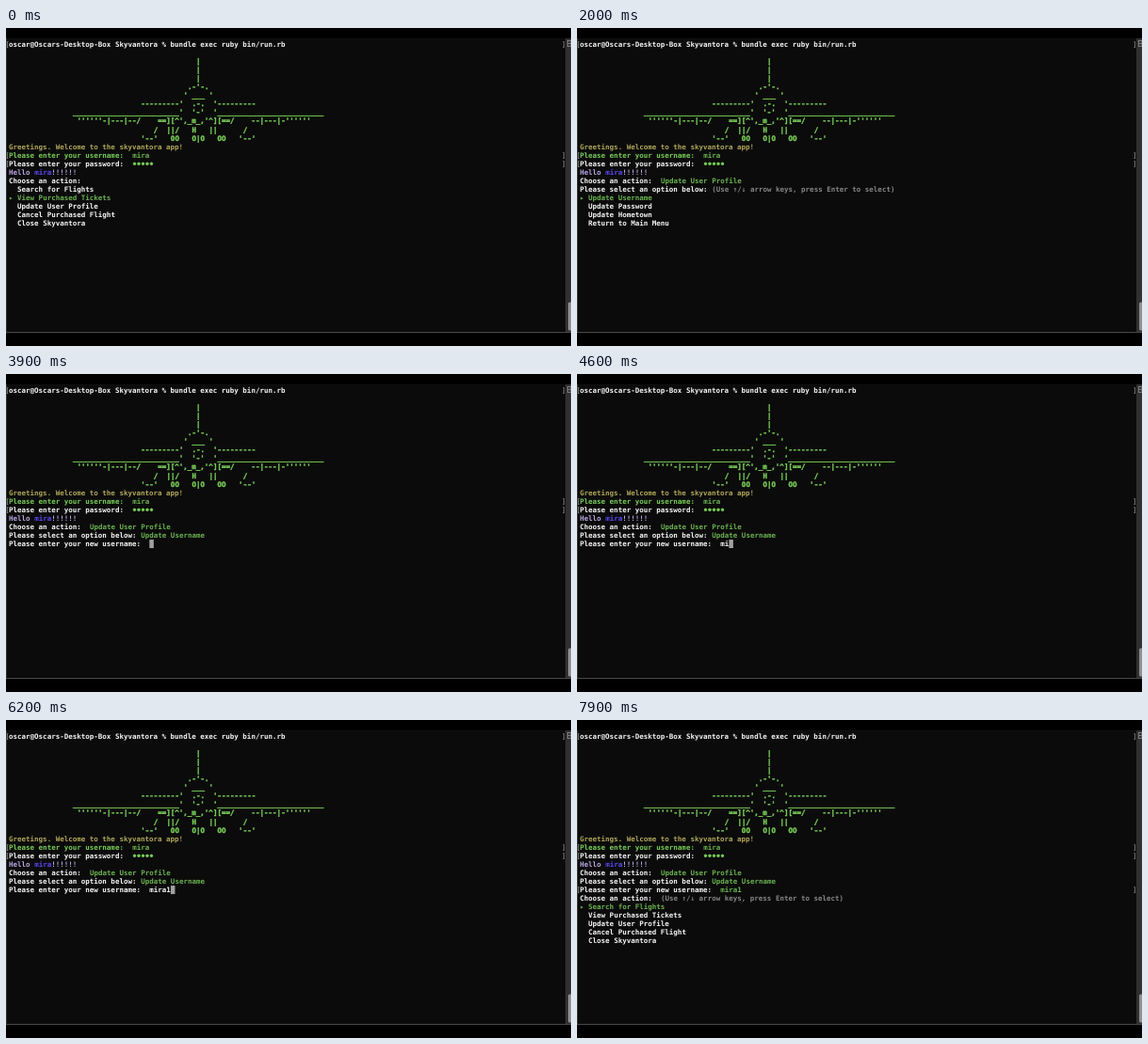
An HTML page that plays this animation: 600x338 px, repeating every 8 s.

```html
<!DOCTYPE html>
<html lang="en">
<head>
<meta charset="utf-8">
<title>Terminal session</title>
<style>
  html, body { margin: 0; width: 100%; height: 100%; overflow: hidden; background: #000; }
  svg { display: block; width: 600px; height: 338px; }
  text {
    font: bold 7.516px "DejaVu Sans Mono", "Noto Sans Mono", monospace;
    white-space: pre;
    text-rendering: geometricPrecision;
  }
  .white { fill: #f4f4f4; }
  .art { fill: #78cc58; stroke: #78cc58; stroke-width: .4px; }
  .ask { fill: #78cc58; }
  .dots { fill: #78cc58; stroke: #78cc58; stroke-width: .8px; }
  .pick { fill: #69b150; }
  .gold { fill: #b0a659; }
  .lilac { fill: #b9a6e2; }
  .blue { fill: #5a48ee; }
  .hint { fill: #858585; }
  .mark { fill: #a0a0a0; font-weight: normal; }
</style>
</head>
<body>
<svg viewBox="0 0 600 338">
  <rect width="600" height="338" fill="#000"/>
  <rect y="11" width="600" height="313" fill="#0b0b0b"/>
  <rect y="11" width="600" height="1" fill="#0f0f0f"/>
  <rect y="11" width="1" height="312" fill="#303030"/>
  <rect y="323" width="600" height="1" fill="#484848"/>
  <rect x="594" y="11" width="6" height="312" fill="#303030"/>
  <rect x="596.5" y="13.5" width="3.5" height="6" fill="none" stroke="#8c8c8c" stroke-width=".8"/>
  <path d="M596.5 16.5h3.5" stroke="#8c8c8c" stroke-width=".8"/>
  <rect x="597" y="291.5" width="5" height="30" rx="1.5" fill="#8e8e8e"/>
  <g id="fixed"></g>
  <g id="live"></g>
</svg>
<script>
const LOOP = 8000;
const LEFT = 3, CELL = 4.525, BASE = 19.8, PITCH = 9.07;
const NS = "http://www.w3.org/2000/svg";
const fixed = document.getElementById("fixed");
const live = document.getElementById("live");

const add = (parent, tag, attrs, content = "") => {
  const el = document.createElementNS(NS, tag);
  for (const key in attrs) el.setAttribute(key, attrs[key]);
  el.textContent = content;
  parent.append(el);
};
const colX = col => LEFT + col * CELL;
const rowY = row => BASE + row * PITCH;

const write = (parent, row, col, style, str) =>
  add(parent, "text", { x: colX(col), y: rowY(row), class: style }, str);

// Small brackets that flag a prompt line at both window edges
const flag = (parent, row) => {
  add(parent, "text", { x: -0.8, y: rowY(row), class: "mark" }, "[");
  add(parent, "text", { x: 590, y: rowY(row), class: "mark" }, "]");
};

const MAIN = ["Search for Flights", "View Purchased Tickets", "Update User Profile",
  "Cancel Purchased Flight", "Close Skyvantora"];
const PROFILE = ["Update Username", "Update Password", "Update Hometown", "Return to Main Menu"];
const HINT = "(Use ↑/↓ arrow keys, press Enter to select)";

function menu(row, items, selected) {
  items.forEach((item, i) => {
    const on = i === selected;
    if (on) write(live, row + i, 0, "pick", "▸");
    write(live, row + i, 2, on ? "pick" : "white", item);
  });
}

// [column, text] for each row of the plane
const PLANE = [
  [44, "|"], [44, "|"], [44, "|"],
  [42, ".-'-."],
  [41, "' ___ '"],
  [31, "---------'  .-.  '---------"],
  [15, "_".repeat(25) + "'  '-'  '" + "_".repeat(25)],
  [16, "''''''-|---|--/    ==][^',_m_,'^][==/    --|---|-''''''"],
  [34, "/  ||/   H   ||      /"],
  [31, "'--'   OO   O|O   OO   '--'"]
];

function drawFixed() {
  write(fixed, 0, 0, "white", "oscar@Oscars-Desktop-Box Skyvantora % bundle exec ruby bin/run.rb");
  PLANE.forEach(([col, str], i) => write(fixed, i + 2, col, "art", str));
  write(fixed, 12, 0, "gold", "Greetings. Welcome to the skyvantora app!");
  write(fixed, 13, 0, "ask", "Please enter your username:");
  write(fixed, 13, 29, "pick", "mira");
  write(fixed, 14, 0, "white", "Please enter your password:");
  write(fixed, 14, 29, "dots", "•••••");
  write(fixed, 15, 0, "lilac", "Hello");
  write(fixed, 15, 6, "blue", "mira");
  write(fixed, 15, 10, "lilac", "!!!!!!");
  write(fixed, 16, 0, "white", "Choose an action:");
  [0, 13, 14].forEach(row => flag(fixed, row));
}

function profileChosen() {
  write(live, 16, 19, "pick", "Update User Profile");
  write(live, 17, 0, "white", "Please select an option below:");
}

function namePrompt(typed, done) {
  profileChosen();
  write(live, 17, 31, "pick", "Update Username");
  write(live, 18, 0, "white", "Please enter your new username:");
  write(live, 18, 33, done ? "pick" : "white", typed);
  if (!done) {
    add(live, "rect", {
      x: colX(33 + typed.length), y: rowY(18) - 7,
      width: CELL, height: 9, fill: "#a0a0a0"
    });
  }
}

const typing = typed => () => namePrompt(typed, false);

const STEPS = [
  [0, () => menu(17, MAIN, 1)],
  [200, () => menu(17, MAIN, 2)],
  [1900, () => {
    profileChosen();
    write(live, 17, 31, "hint", HINT);
    menu(18, PROFILE, 0);
  }],
  [2800, typing("")],
  [4100, typing("m")],
  [4500, typing("mi")],
  [4700, typing("mir")],
  [4900, typing("mira")],
  [5500, typing("mira1")],
  [6500, () => {
    namePrompt("mira1", true);
    flag(live, 18);
    write(live, 19, 0, "white", "Choose an action:");
    write(live, 19, 19, "hint", HINT);
    menu(20, MAIN, 0);
  }]
];

let shown = null;
const start = performance.now();

function tick() {
  const t = (performance.now() - start) % LOOP;
  const step = STEPS.findLast(([at]) => at <= t);
  if (step !== shown) {
    shown = step;
    live.replaceChildren();
    step[1]();
  }
  requestAnimationFrame(tick);
}

drawFixed();
tick();
</script>
</body>
</html>
```
